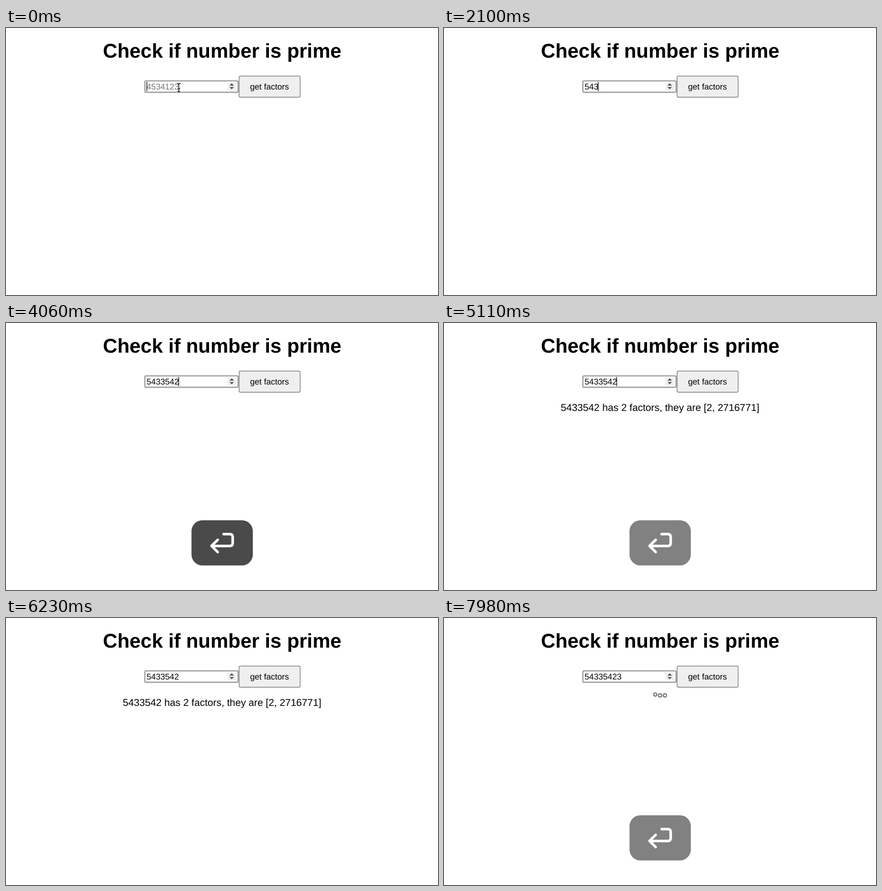
Animation, 800 px wide and 495 px high, one loop 8000 ms. Source, as an HTML page:

```html
<!DOCTYPE html>
<html lang="en">
<head>
<meta charset="utf-8">
<title>Check if number is prime</title>
<style>
html, body { margin: 0; width: 100%; height: 100%; overflow: hidden; background: #fff; }
svg { display: block; width: 800px; height: 495px; }
text { font-family: "Liberation Sans", Arial, Helvetica, sans-serif; text-rendering: geometricPrecision; }
.control { font-size: 15.4px; }
</style>
</head>
<body>
<svg viewBox="0 0 800 495">
  <text x="400.3" y="55.4" font-size="36.96" font-weight="700" text-anchor="middle">Check if number is prime</text>

  <rect x="257" y="97.9" width="173" height="21.4" rx="2.4" fill="#fff" stroke="#b4b4b4" stroke-width="2.4"/>
  <rect x="257.6" y="98.5" width="171.8" height="20.2" rx="1.5" fill="none" stroke="#8c8c8c" stroke-width="1"/>
  <rect x="410" y="101" width="16" height="15" fill="#efefef"/>
  <path d="M413.8 106.8 L418 102.6 L422.2 106.8Z M413.8 109.4 L418 113.6 L422.2 109.4Z" fill="#505050"/>
  <text id="value" class="control" x="260.3" y="114"></text>
  <rect id="caret" y="100" width="1.2" height="17"/>

  <rect x="431.7" y="89.2" width="113" height="39.2" rx="2.6" fill="#efefef" stroke="#767676" stroke-width="1.2"/>
  <text class="control" x="452" y="114">get factors</text>

  <text id="result" x="400" y="163" font-size="18.48" text-anchor="middle">5433542 has 2 factors, they are [2, 2716771]</text>

  <g id="loader" fill="none" stroke="#707070" stroke-width="1.9">
    <circle cx="391.2" r="3"/><circle cx="400.1" r="3"/><circle cx="409" r="3"/>
  </g>

  <g id="pointer" fill="none" stroke-linecap="round" stroke-linejoin="round">
    <path id="beam" d="M316.8 102.7 Q320 102.7 320 105 Q320 102.7 323.2 102.7 M320 105 V116.6 M316.8 118.6 Q320 118.6 320 116.4 Q320 118.6 323.2 118.6 M318 112.6 H322" stroke="#fff" stroke-width="3"/>
    <use href="#beam" style="stroke:#000"/>
  </g>

  <g id="key">
    <rect x="343.5" y="365.8" width="113.6" height="83.6" rx="20" fill="#4a4a4a"/>
    <path d="M403 391.4 H414.5 Q419.8 391.4 419.8 396.7 V408 Q419.8 413.3 414.5 413.3 H381 M392 402 L380.6 413.3 L392 424.6" fill="none" stroke="#fff" stroke-width="4.8" stroke-linecap="round" stroke-linejoin="round"/>
  </g>
</svg>
<script>
const LOOP = 8000, TICK = 70, DIGIT = 8.565;
const $ = id => document.getElementById(id);
const [value, caret, result, loader, pointer, key] =
  ["value", "caret", "result", "loader", "pointer", "key"].map($);
const dots = [...loader.children];

const beam = $("beam");
const ink = beam.cloneNode();
ink.removeAttribute("id");
ink.setAttribute("stroke", "#000");
ink.setAttribute("stroke-width", "1.3");
pointer.replaceChildren(beam, ink);

// [time, value] steps: each holds until the next one
const typed = [[0, ""], [1330, "5"], [1680, "54"], [2100, "543"], [2590, "5433"],
  [2940, "54335"], [3150, "543354"], [3570, "5433542"], [6300, "54335423"]];
const caretOn = [[0, 1], [490, 0], [1050, 1], [4620, 0], [5110, 1], [5670, 0],
  [6300, 1], [6860, 0], [6930, 1], [7420, 0]];
const resultOn = [[0, 0], [4200, 1], [7000, 0]];
const keyAlpha = [[0, 0], [4060, 1], [5110, 0.69], [5180, 0.42], [5250, 0.18], [5320, 0],
  [6930, 1], [7980, 0.69]];

const at = (steps, t) => steps.findLast(s => s[0] <= t)[1];
const show = (el, on) => { el.style.visibility = on ? "visible" : "hidden"; };

function draw(t) {
  const text = at(typed, t);
  value.textContent = text || "4534123";
  value.setAttribute("fill", text ? "#000" : "#757575");
  caret.setAttribute("x", text ? 259.2 + text.length * DIGIT : 260.2);
  show(caret, at(caretOn, t));
  show(pointer, !text);
  show(result, at(resultOn, t));
  show(loader, t >= 7000);
  dots.forEach((dot, i) => {
    const phase = (t - 7420 - (i - 1) * 187) / 933;
    dot.setAttribute("cy", 142.3 - 1.4 * Math.cos(2 * Math.PI * phase));
  });
  key.style.opacity = at(keyAlpha, t);
}

const start = performance.now();
function frame(now) {
  const t = Math.max(0, now - start) % LOOP;
  draw(Math.floor(t / TICK) * TICK);
  requestAnimationFrame(frame);
}
draw(0);
requestAnimationFrame(frame);
</script>
</body>
</html>
```
